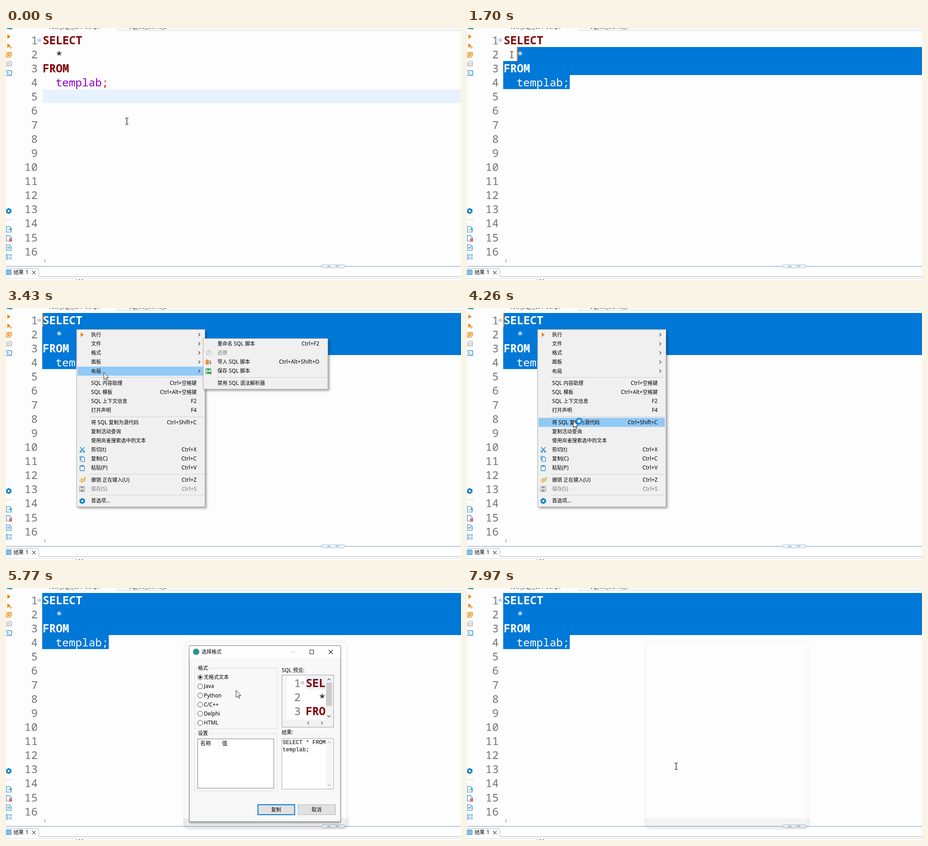
An HTML page that plays this animation: 1005 by 557 pixels, repeating every 8000 ms.

```html
<!DOCTYPE html>
<html lang="zh">
<head>
<meta charset="utf-8">
<title>SQL editor</title>
<style>
html, body { margin: 0; width: 100%; height: 100%; overflow: hidden; background: #fdfdfd; }
#stage { position: absolute; left: 0; top: 0; width: 100%; height: 100%; overflow: hidden; contain: paint; }
svg { position: absolute; left: 0; top: 0; width: 1005px; height: 557px; overflow: hidden; }
text { font: 11px "Noto Sans", "Noto Sans CJK SC", "Noto Sans CJK", sans-serif; fill: #000; white-space: pre; }
.lat { font-size: 11.8px; }
.code { font: 24.3px "Noto Sans Mono", monospace; }
.kw { font-weight: 700; fill: #800000; }
.num { fill: #737373; text-anchor: end; }
.end { text-anchor: end; }
.mid { text-anchor: middle; }
.off { fill: #777; }
.out { font: 12.2px "Liberation Mono", monospace; }
.sel text, .sel tspan { fill: #fff; }
.ln { fill: none; stroke-linecap: square; }
.row5, .sel, #caret, #hl, #ibeam, #arrow, #ring { animation: 8s step-end infinite; }
#menu, #sub, #picked, #halo, #dialog, #hover { animation: 8s linear infinite; }
.row5 { animation-name: row5; }
#sel0 { animation-name: sel0; }
#sel1 { animation-name: sel1; }
#sel2 { animation-name: sel2; }
#sel3 { animation-name: sel3; }
#caret { width: 2px; height: 31px; animation-name: caret; mix-blend-mode: difference; }
#hl { animation-name: hl; }
#menu { animation-name: menu; }
#sub { animation-name: sub; }
#picked { animation-name: picked; }
#halo { animation-name: halo; }
#dialog { animation-name: dialog; transform-origin: 572px 322px; }
#hover { animation-name: hover; }
#ring { animation-name: ring; }
#arrow { animation-name: arrow; }
#ibeam { left: -8px; top: -10px; width: 16px; height: 20px; mix-blend-mode: difference; animation: move 8s linear infinite, ibeam 8s step-end infinite; }
#pointer { animation: move 8s linear infinite; }
</style>
</head>
<body>
<div id="stage"></div>
<script>
const ui = s => s.replace(/[\x20-\x7e]+/g, '<tspan class="lat">$&</tspan>');
const label = (x, y, s, cls = '') => `<text x="${x}" y="${y + 4}" class="${cls}">${ui(s)}</text>`;
const code = (x, y, s, cls = '') => `<text x="${x}" y="${y}" class="code ${cls}">${s}</text>`;
const box = (x, y, w, h, fill, more = '') => `<rect x="${x}" y="${y}" width="${w}" height="${h}" fill="${fill}" ${more}/>`;
const line = (d, stroke, w = 1, more = '') => `<path class="ln" d="${d}" stroke="${stroke}" stroke-width="${w}" ${more}/>`;
const shape = (d, fill) => `<path d="${d}" fill="${fill}"/>`;
const dot = (x, y, r, fill, more = '') => `<circle cx="${x}" cy="${y}" r="${r}" fill="${fill}" ${more}/>`;
const svg = (body, attr = '') => `<svg ${attr}>${body}</svg>`;
const group = (id, body) => `<g id="${id}">${body}</g>`;
const rowTop = i => Math.round(11 + 31.13 * i);
const base = i => 35.8 + 31.13 * i;
const BLUE = '#1483c5', ORANGE = '#ef8200';

// Icons
const play = (x, y) => shape(`M${x} ${y - 5}l7 5l-7 5z`, ORANGE);
const gear = (x, y) => dot(x, y, 4, 'none', `stroke="${BLUE}" stroke-width="3.4"`) +
  dot(x, y, 5.8, 'none', `stroke="${BLUE}" stroke-width="1.8" stroke-dasharray="3 3.07"`);
const page = (y, c) => line(`M.5 ${y - 6}h7l4 4v8.5h-11z`, c, 1.2);
const floppy = (x, y, c) => box(x - 5.5, y - 5.5, 11, 11, 'none', `stroke="${c}" stroke-width="1.3"`) +
  box(x - 3, y - 5, 6, 3.5, c) + box(x - 3, y + 1, 6, 4, c);
const fold = (x, y) => dot(x, y, 3.4, '#eef4fa', 'stroke="#8fa9c4" stroke-width=".9"') + line(`M${x - 1.5} ${y}h3`, '#5b7c9d');
const chevron = (x, y, dx, dy, c = '#555') => dy
  ? line(`M${x - 3} ${y + 1.5 * dy}l3 ${-3 * dy}l3 ${3 * dy}`, c, 1.4)
  : line(`M${x - 1.5 * dx} ${y - 3}l${3 * dx} 3l${-3 * dx} 3`, c, 1.2);

// Editor
const lines = [
  code(81, base(0), 'SELECT', 'kw'),
  code(110, base(1) + 2, '*'),
  code(81, base(2), 'FROM', 'kw'),
  code(109.5, base(3), '<tspan fill="#8e00c6">templab</tspan><tspan fill="#f00">;</tspan>')
];
let editor = box(0, 0, 1005, 557, '#fdfdfd') + box(81, rowTop(4), 924, 30, '#e8f2fe', 'class="row5"');
for (let i = 0; i < 16; i++) editor += code(70, base(i), i + 1, 'num');
editor += lines.join('') + fold(73.5, 27);

const tools =
  shape('M2 0h8v2h-8z', BLUE) + box(8, 0, 6, 3, '#3aa76d') +
  play(3, 19) + play(3, 39) + line('M7.5 43h5M10 40.5v5', ORANGE, 1.2) +
  line('M2 54h10v8M1 64.5h8v-8h-7z', ORANGE, 1.5) + shape('M4 57l4 3l-4 3z', ORANGE) +
  line('M3 74h9v10h-10v-8M4 78h5M4 81h5', '#8a8a8a') +
  box(-1, 94.5, 13.5, 10.5, '#fff', `stroke="${BLUE}" stroke-width="1.3"`) + line('M2 97l3 2.5l-3 2.5M6.5 102.5h3', BLUE, 1.2) +
  gear(6, 404.5) + line('M0 423.5h13', '#777', 1.3, 'stroke-dasharray="1 3" style="stroke-linecap:butt"') +
  page(444.5, BLUE) + line('M4 445h8M9.5 442.5l2.5 2.5l-2.5 2.5', BLUE, 1.2) +
  page(464.5, BLUE) + box(7.5, 465, 5.5, 7, '#d33') + box(9.6, 466.5, 1.3, 4, '#fff') +
  page(485, BLUE) + line('M4 483q-2 2.5 0 5M8 483q2 2.5 0 5M5 484l2 3M7 484l-2 3', BLUE, .9) +
  box(.5, 500, 4, 4, 'none', `stroke="${BLUE}"`) + box(.5, 507, 4, 4, 'none', `stroke="${BLUE}"`) +
  line('M7.5 500.5h5M7.5 503.5h5M7.5 507.5h5M7.5 510.5h5', BLUE);

const frame =
  box(246, 0, 759, 5.5, '#f8f8f8') + line('M246.5 0v5.5H1005', '#d9d9d9') +
  label(96, -3, '为存_sq_l_表单 Script') + label(272, -3, 'sq_lab_demo_a') +
  chevron(86, 515, -1, 0, '#999') +
  box(0, 527, 1005, 30, '#fefefe') + line('M0 526.75H1005', '#9ab3cb', 1.5) +
  box(697.5, 523.5, 50, 6.5, '#f4f8fb', 'rx="1.5" stroke="#9dbcd6"') +
  shape('M707 528.5l6-3.5l6 3.5z', '#a9bfd2') + shape('M726 525l6 3.5l6-3.5z', '#a9bfd2') +
  line('M0 531.5H69q3.5 0 3.5 4V549.5H1005', '#b4b4b4') +
  box(.5, 535, 10.5, 10, '#fff', `stroke="${BLUE}" stroke-width="1.3"`) + line('M0 538h11M4 535v10M7.5 535v10M0 541.5h11', BLUE, 1.1) +
  label(17, 540, '结果') + label(43, 540, '1') + line('M58 537l7 7M65 537l-7 7', '#444', 1.1) +
  line('M0 553.5H1005', '#d8d8d8') + label(152, 561, '100');

const picks = [925, 925, 925, 147].map((w, i) =>
  svg(box(80, rowTop(i), w, 31, '#0078d7') + lines[i], `class="sel" id="sel${i}"`)).join('');

// Menus; a leading '-' puts a separator above, a leading '!' greys the entry
function list(rows, x, right, y, left) {
  let out = '';
  const ys = rows.map(([name, keys = '']) => {
    if (name[0] === '-') {
      y += 6.3;
      out += line(`M${left} ${Math.round(y - 13.2) + .5}H${right + 16}`, '#d0d0d0');
    }
    const cls = name[0] === '!' ? 'off ' : '', at = y;
    out += label(x, at, name.replace(/^[-!]/, ''), cls) + label(right, at, keys, cls + 'end');
    y += 20.13;
    return at;
  });
  return { out, ys };
}
const panel = (x, y, w, h) => box(x + 4, y + 4, w - 1, h - 1, '#000', 'opacity=".35" filter="url(#soft)"') +
  box(x + .5, y + .5, w - 1, h - 1, '#f0f0f0', 'stroke="#a5a5a5"');
const main = list([
  ['执行'], ['文件'], ['格式'], ['面板'], ['布局'],
  ['-SQL 内容助理', 'Ctrl+空格键'], ['SQL 模板', 'Ctrl+Alt+空格键'], ['SQL 上下文信息', 'F2'], ['打开声明', 'F4'],
  ['-将 SQL 复制为源代码', 'Ctrl+Shift+C'], ['复制活动查询'], ['使用岚雀搜索选中的文本'],
  ['剪切(t)', 'Ctrl+X'], ['复制(C)', 'Ctrl+C'], ['粘贴(P)', 'Ctrl+V'],
  ['-撤销 正在键入(U)', 'Ctrl+Z'], ['!保存(S)', 'Ctrl+S'], ['-首选项...']
], 188, 421, 59, 185);
const icons = play(165, 59) +
  line('M164 308l7.5 8M173 308l-7.5 8', BLUE, 1.5) +
  [165, 172].map(x => dot(x, 317.5, 1.8, 'none', `stroke="${BLUE}" stroke-width="1.3"`)).join('') +
  line('M163.5 336v-8h7.5', BLUE, 1.2) + box(165.5, 330, 8, 9.5, 'none', `stroke="${BLUE}" stroke-width="1.2" rx="1"`) +
  box(163.5, 349, 9.5, 10.5, '#fff', `stroke="${BLUE}" stroke-width="1.3" rx="1"`) + box(165.5, 347.5, 5.5, 3, BLUE) +
  '<path d="M162.5 381l5.5-5v3h4l1.5-4.5h2l-1.500 8h-6v3.500z" fill="#ffe08a" stroke="#b98a1c"/>' +
  floppy(168, 400, '#9a9a9a') + gear(168.5, 426.5);
const arrows = main.ys.slice(0, 5).map(y => chevron(427, y, 1, 0, '#333')).join('');
const mark = (y = 0) => box(158, y - 10, 279, 20, '#91c9f7');
const menu = group('menu', panel(155.5, 47, 284.5, 393) + group('hl', mark()) + main.out + icons + arrows);

const side = list([['重命名 SQL 脚本', 'Ctrl+F2'], ['!还原'], ['导入 SQL 脚本', 'Ctrl+Alt+Shift+O'], ['保存 SQL 脚本'], ['-禁用 SQL 语法解析器']], 467, 692, 79, 464);
const sub = group('sub', panel(435, 67, 276.5, 113) + side.out +
  dot(448, 99.5, 5.5, '#f4f4f4', 'stroke="#b5b5b5" stroke-width="1.3"') + line('M448 96v4h-3', '#b5b5b5', 1.2) +
  shape('M441 114h5l1.5 2h6v9h-12.5z', '#f0923a') + box(448, 118.5, 7, 8, '#fff') + line('M451.5 125v-5M449.5 122l2-2l2 2', BLUE, 1.3) +
  floppy(447, 139.5, '#2f9e4f') + box(449, 142, 5, 4, '#2f9e4f'));

const pickedY = main.ys[9];
const picked = group('picked', mark(pickedY) + label(188, pickedY, '将 SQL 复制为源代码') + label(421, pickedY, 'Ctrl+Shift+C', 'end'));

// Dialog
const halo = group('halo', box(394, 118, 360, 413, 'none', 'rx="12" stroke="#000" stroke-opacity=".022" stroke-width="7"') +
  shape('M391 509h366v10q0 15-16 15h-334q-16 0-16-15z', 'rgba(0,0,0,.06)'));
const fieldset = (y, h, name) => box(416.5, y + .5, 182, h, 'none', 'stroke="#dcdcdc"') + box(422, y - 3, 26, 7, '#f8f8f8') + label(424, y, name);
const field = (x, y, w, h, stroke) => box(x + .5, y + .5, w, h, '#fff', `stroke="${stroke}"`);
const radios = ['无格式文本', 'Java', 'Python', 'C/C++', 'Delphi', 'HTML'].map((s, i) => {
  const y = 197.3 + 20.15 * i;
  return dot(429, y, 5.5, '#fff', 'stroke="#444"') + (i ? '' : dot(429, y, 3, '#222')) + label(437, y, s);
}).join('');
const preview = field(609, 192, 114, 115, '#9a9a9a') + box(610, 193, 11, 98, '#f6f6f6') + box(661, 194, 44.5, 31, '#e8f2fe') +
  [1, 2, 3].map((n, i) => code(651, 219 + 31 * i, n, 'num')).join('') + fold(655, 209.5) +
  code(662, 219, 'SEL', 'kw') + code(691, 252, '*') + code(662, 281, 'FRO', 'kw') +
  box(706, 193, 17, 98, '#f3f3f3') + box(610, 291, 113, 16, '#f3f3f3') + box(707, 209, 13, 52, '#cdcdcd') +
  chevron(713.5, 202, 0, 1) + chevron(713.5, 283.5, 0, -1) + chevron(667.5, 298.5, -1, 0) + chevron(698, 298.5, 1, 0);
const button = (x, w, s, more) => box(x + .5, 479, w, 22, '#e1e1e1', more) + label(x + w / 2, 490, s, 'mid');
const dialog = group('dialog',
  box(405, 130, 334, 390, '#000', 'opacity=".3" filter="url(#soft)"') +
  box(405, 127.5, 334, 389, '#f8f8f8', 'stroke="#747474"') + box(405.5, 128, 333, 27, '#fefefe') +
  dot(420, 141, 7, '#2f8f95') + label(432, 141, '选择格式') +
  line('M629 141.5h9', '#bbb') + box(671, 137, 8.5, 8.5, 'none', 'stroke="#111"') + line('M713 137l8.5 8.5M721.5 137l-8.5 8.5', '#111', 1.1) +
  fieldset(177, 134, '格式') + radios + fieldset(321, 127, '设置') +
  field(423, 333, 168, 109, '#777') + line('M470.5 334.5v21', '#e3e3e3') +
  `<g transform="translate(429 344) scale(1.09)">${label(0, 0, '名称')}${label(44, 0, '值')}</g>` +
  label(609, 181.5, 'SQL 预览:') + preview + label(609, 318.5, '结果:') +
  field(609, 332, 114, 112, '#a8a8a8') + box(706.5, 333, 16, 111, '#f6f6f6') + chevron(714, 341, 0, 1, '#bbb') + chevron(714, 436, 0, -1, '#bbb') +
  '<text class="out" x="611" y="345">SELECT * FROM</text><text class="out" x="611" y="360.5">templab;</text>' +
  button(556, 81, '复制', 'id="hover" stroke="#0078d7"') + button(645, 82, '取消', 'stroke="#adadad"'));

const pointer = group('pointer',
  group('arrow', '<path d="M0 0v15.5l3.5-3.3l2.5 5.2l2.2-1l-2.5-5h4.9z" fill="#fff" stroke="#000" stroke-width=".9"/>') +
  group('ring', dot(12.5, 1, 5.4, '#fff', 'stroke="#1b8be0" stroke-width="4"')));

// Timeline, keyed by milliseconds
let css = '';
function keys(name, frames) {
  const list = Object.entries(frames);
  list.push([8000, list.at(-1)[1]]);
  css += `@keyframes ${name}{${list.map(([ms, v]) => `${ms / 80}%{${v}}`).join('')}}`;
}
const map = (frames, fn) => Object.fromEntries(Object.entries(frames).map(([ms, v]) => [ms, fn(v)]));
const fade = (name, frames) => keys(name, map(frames, v => `opacity:${v}`));
const from = (name, frames) => keys(name, map({ 0: 1005, ...frames }, x => `clip-path:inset(0 0 0 ${x}px)`));
const to = ([x, y]) => `transform:translate(${x}px,${y}px)`;

keys('move', map({
  0: [267, 206], 380: [267, 206], 430: [263, 189], 670: [132, 184], 980: [132, 184], 1130: [232, 134],
  1410: [232, 134], 1560: [135, 92], 1700: [99, 59], 1850: [74, 41], 2040: [62, 34], 2200: [62, 34], 2450: [157, 47],
  2639: [157, 47], 2640: [156, 47], 2820: [186, 73], 3340: [188, 76], 3430: [216, 142], 3600: [230, 226], 3760: [235, 249],
  4830: [235, 249], 5070: [252, 245], 5200: [262, 243], 5600: [508, 226], 5770: [508, 226], 6200: [575, 360], 6550: [626, 466],
  6610: [626, 466], 6860: [607, 486], 7830: [607, 486], 7970: [462, 394]
}, to));
fade('row5', { 0: 1, 1410: 0 });
from('sel3', { 1440: 183, 1490: 154, 1550: 80 });
from('sel2', { 1550: 125, 1610: 80 });
from('sel1', { 1610: 125, 1660: 110, 1750: 95, 1800: 80 });
from('sel0', { 1800: 95, 1880: 80 });
const bar = (x, i) => 'opacity:1;' + to([x, rowTop(i)]);
keys('caret', { 0: 'opacity:0', 1660: bar(110, 1), 1750: bar(95, 1), 1800: bar(95, 0), 1880: bar(80, 0), 4830: 'opacity:0' });
fade('ibeam', { 0: 1, 2640: 0, 7660: 1 });
fade('arrow', { 0: 0, 2640: 1, 7660: 0 });
fade('ring', { 0: 0, 4260: 1, 5600: 0 });
fade('menu', { 0: 0, 2639: 0, 2640: .13, 2850: 1, 4829: 1, 4830: 0 });
fade('sub', { 0: 0, 3199: 0, 3200: .13, 3400: 1, 3779: 1, 3780: 0 });
const row = i => 'opacity:1;' + to([0, main.ys[i]]);
keys('hl', {
  0: 'opacity:0', 2820: row(1), 3365: row(2), 3390: row(3), 3410: row(4), 3460: row(5),
  3500: row(6), 3540: row(7), 3590: row(8), 3640: row(9)
});
fade('picked', { 0: 0, 4829: 0, 4830: 1, 5070: .06, 5160: 0 });
fade('halo', { 0: 0, 4950: 0, 5070: 1, 7370: 1, 7600: .7 });
const zoom = (o, s) => `opacity:${o};transform:scale(${s})`;
keys('dialog', { 0: zoom(0, .93), 4950: zoom(0, .93), 5070: zoom(.63, .984), 5190: zoom(1, 1), 7370: zoom(1, 1), 7560: zoom(0, .93) });
const idle = 'fill:#e1e1e1;stroke-width:2px';
keys('hover', { 0: idle, 6610: idle, 6860: 'fill:#e5f1fb;stroke-width:1px' });

const style = document.createElement('style');
style.textContent = css;
document.head.append(style);
document.getElementById('stage').innerHTML =
  svg(editor) + picks + svg(box(0, 0, 2, 31, '#fff'), 'id="caret"') + svg(tools + frame) +
  svg('<filter id="soft"><feGaussianBlur stdDeviation="2.5"/></filter>' + halo + picked + menu + sub + dialog + pointer) +
  svg(line('M5 3h2M9 3h2M8 3.5v13M5 17h2M9 17h2', '#fff', 1.2), 'id="ibeam"');
</script>
</body>
</html>
```
